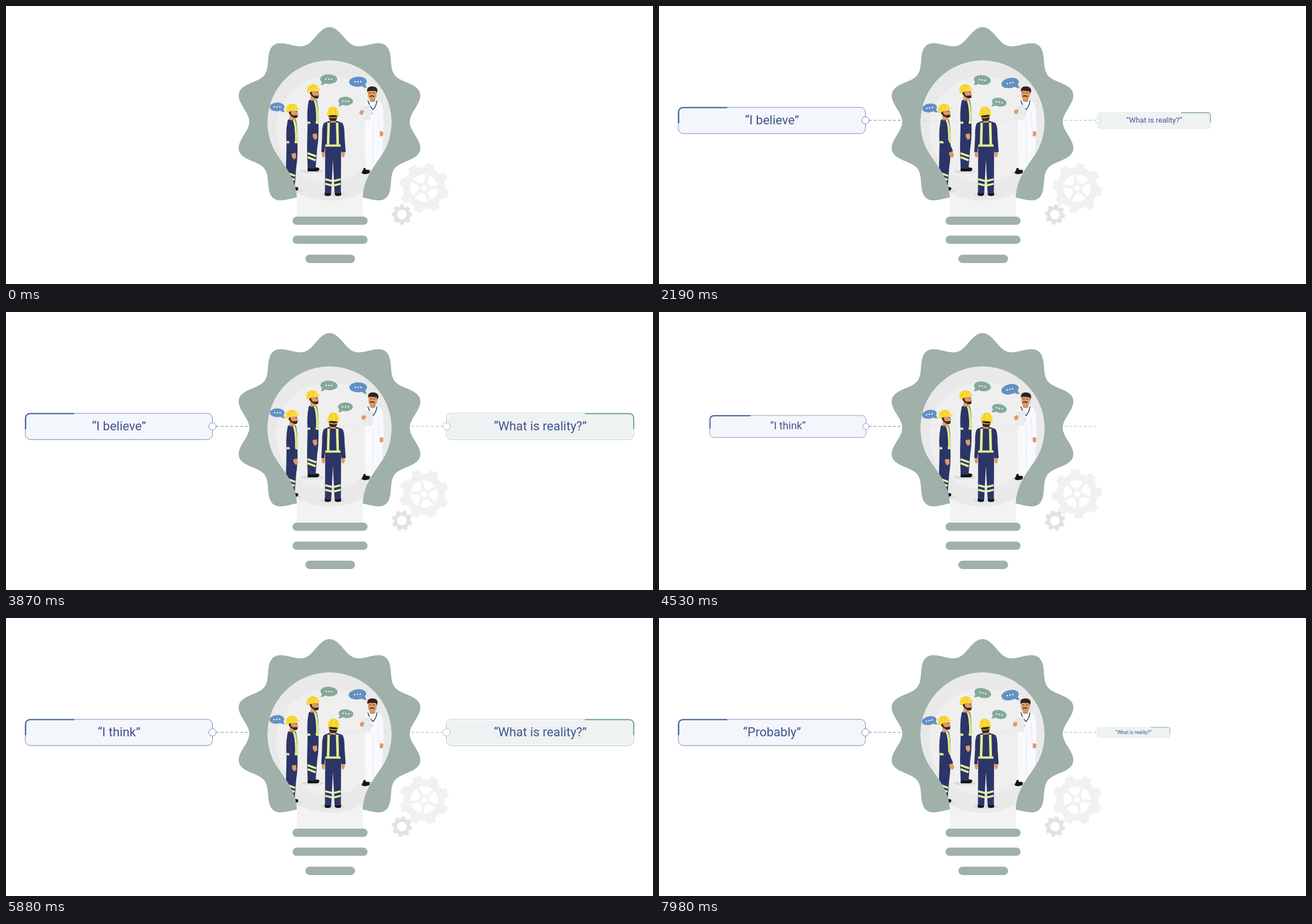
An HTML page for the animation above (8 s loop, 1139 by 491 pixels).

```html
<!DOCTYPE html>
<html lang="en">
<head>
<meta charset="utf-8">
<title>Conversation bulb</title>
<style>
  html, body { margin: 0; width: 100%; height: 100%; overflow: hidden; background: #fff; }
  svg { display: block; width: 100vw; height: 100vh; }
  text { font: 400 22px Roboto, Inter, sans-serif; fill: #42538f; text-anchor: middle; }
</style>
</head>
<body>
<svg id="stage" viewBox="0 0 1139 491"></svg>
<script>
const LOOP = 8000, CYCLE = 2940, TAU = Math.PI * 2;
const NAVY = '#2c3568', SAGE = '#9fb1a9', LIME = '#d5e860', PALE = '#eef0dc', SKIN = '#dd9a68', HAIR = '#35271f';
const stage = document.getElementById('stage');

const polar = (cx, cy, r, a) => `${(cx + r * Math.sin(a)).toFixed(2)},${(cy - r * Math.cos(a)).toFixed(2)}`;
const path = (d, fill, extra = '') => `<path d="${d}" fill="${fill}" ${extra}/>`;
const stroke = (d, color, width, extra = '') =>
  `<path d="${d}" fill="none" stroke="${color}" stroke-width="${width}" ${extra}/>`;
const circle = (x, y, r, fill, extra = '') => `<circle cx="${x}" cy="${y}" r="${r}" fill="${fill}" ${extra}/>`;
const ellipse = (x, y, rx, ry, fill) => `<ellipse cx="${x}" cy="${y}" rx="${rx}" ry="${ry}" fill="${fill}"/>`;
const part = (id, body) => `<g id="${id}">${body}</g>`;
const reflective = (d, width) => stroke(d, LIME, width) + stroke(d, PALE, width * .4);

function wavyWheel() {
  const points = [];
  for (let i = 0; i < 400; i++) {
    const a = i / 400 * TAU;
    points.push(polar(569.5, 204.5, 153.6 + 13 * Math.cos(10 * a) + 0.7 * Math.cos(20 * a), a));
  }
  return path(`M${points.join(' ')}Z`, SAGE);
}

function cog(id, cx, cy, teeth, outer, root, hole, color, extra = '') {
  const points = [], step = TAU / teeth;
  for (let i = 0; i < teeth; i++) {
    [[-.27, root], [-.18, outer], [.18, outer], [.27, root]]
      .forEach(([k, r]) => points.push(polar(cx, cy, r, (i + k) * step)));
  }
  const ring = `M${cx - hole},${cy}a${hole},${hole} 0 1 0 ${2 * hole},0a${hole},${hole} 0 1 0 ${-2 * hole},0Z`;
  return part(id, path(`M${points.join(' ')}Z${ring}`, color,
    `fill-rule="evenodd" stroke="${color}" stroke-width="2" stroke-linejoin="round"`) + extra);
}

function bigCog() {
  let hub = '';
  for (let i = 0; i < 5; i++) {
    const a = TAU * i / 5;
    hub += stroke(`M${polar(736, 321.5, 8, a)}L${polar(736, 321.5, 27, a)}`, '#f1f1f1', 5);
  }
  hub += circle(736, 321.5, 7.5, 'none', 'stroke="#f1f1f1" stroke-width="4.5"');
  return cog('bigCog', 736, 321.5, 8, 43, 36, 25, '#f1f1f1', hub);
}

function bubble(id, x, y, rx, ry, tail, color) {
  const [tx, ty] = tail, side = Math.sign(tx - x);
  return part(id, ellipse(x, y, rx, ry, color) +
    path(`M${x + side * rx * .8},${y + ry * .3}Q${tx - side * 2},${ty - 3} ${tx},${ty}Q${tx - side * 6},${ty} ${x + side * rx * .4},${y + ry * .8}Z`, color) +
    [-5, 0, 5].map(d => circle(x + d, y, 1.25, '#fff')).join(''));
}

function sideWorker(id) {
  return ellipse(538, 292, 20, 3.5, '#dedede') +
    path('M531,285H546L551,286Q553,290 548,292H531Z', '#141414') +
    path('M531,204H550Q551,232 548,250L545,287H531L530,250Z', NAVY) +
    path('M533,167Q540,161 547,166Q551,178 550,209H531Q529,186 533,167Z', NAVY) +
    stroke('M543,165Q549,176 548,205', LIME, 4) + stroke('M542.5,166Q547.5,178 546.5,205', PALE, 1.3) +
    reflective('M531,206H551', 4) +
    reflective('M531,260L546,265.5M531,267L545,272.5', 3.8) +
    part(id + 'Arm', path('M540,224H547L548,232Q546,237 543,236L540,231Z', SKIN) +
      path('M533,194L543,192L548,225L540,226Z', NAVY)) +
    path('M533,169Q541,165 543,175L544,200Q538,206 533,200Z', NAVY) +
    stroke('M542,172L543,196', '#242b57', .7) +
    part(id + 'Head', path('M537,150H549.5L551.5,157L549.5,163H545V167H536Z', SKIN) +
      path('M535,150H538.5V155Q541,160 545,158.5L550.5,158.5L550,162Q547,165 543,162.5Q538,160 535,155Z', HAIR) +
      path('M546.5,152L550,151.5V152.6H546.5Z', HAIR) +
      path('M530,153Q528,139 540,138Q549,138 551,146L554,148Q553,150 547,149Q538,150 533,154Z', '#fbda35') +
      stroke('M535,149Q536,141 541,139M541,147Q545,142 542,139', '#e4bb20', .9));
}

function backWorker() {
  const legBands = 'M562,306L574,309M562,314L574,317M589,306L577,309M589,314L577,317';
  return ellipse(575, 333, 22, 3.5, '#dcdcdc') +
    path('M561,329H572V334Q566,337 561,334ZM579,329H590V334Q585,337 579,334Z', '#141414') +
    path('M556,256H562L561,266Q558,270 556,264ZM590,256H597L596,265Q593,270 591,265Z', SKIN) +
    path('M562,240H590L589.5,331H578.5L575.5,272L572.5,331H561.5Z', NAVY) +
    path('M569,203H582L592,206.5Q596,211 596,230L598,258H590.5L589,248H562L560.5,258H555L556.5,230Q556,211 560,206.5Z', NAVY) +
    stroke('M562,215V248M590,215V248', '#232b58', .8) +
    stroke('M568,206L567,245M583,206L584,245', LIME, 4.6) +
    stroke('M568,206L567,245M583,206L584,245', PALE, 1.7) +
    reflective('M562,246.5H589', 4) +
    reflective(legBands, 3.8) +
    part('backHead', path('M570.5,198H580.5V206H570.5Z', SKIN) +
      path('M567.5,192H583.5Q583,200 580,203H571Q568,200 567.5,192Z', HAIR) +
      path('M565,194Q565,178 575.5,177.5Q586,178 586,194Q576,191 565,194Z', '#fbda35') +
      stroke('M571,192Q570,183 573,179M580,192Q581,183 578,179', '#e4bb20', .9) +
      stroke('M568,196Q576,199 583,196', '#fbda35', 1.2));
}

function doctor() {
  return ellipse(638, 294, 17, 3, '#dedede') +
    path('M630,286H641L640,295Q630,299 626,295Z', '#141414') +
    path('M636,167Q645,163 655,167Q664,170 664,190L663,250L662,292L633,289Q630,235 632,202L630,176Z', '#f8f9fd') +
    stroke('M657,184L659,218M647,204L646,282', '#e2e4ee', .8) +
    path('M658,220L664,222L664,228Q660,233 658,229Z', SKIN) +
    path('M656,171Q664,172 664,192L665,222L657,221L655,185Z', '#f8f9fd') +
    stroke('M655,186L657,221', '#e0e3ed', .8) +
    stroke('M637,167Q640,177 646,183Q652,177 653,167', '#345277', 1.7) +
    circle(644, 190, 2.4, '#d8dadd') +
    part('clip', path('M625,176L641,174L642,201L626,202Z', '#e9ebec') +
      path('M622,187Q625,182 630,185L629,190Q626,194 623,191Z', SKIN) +
      stroke('M629,180H638', '#d5d8da', 1)) +
    part('docHead', path('M640.5,162H650V168Q645,171 640.5,168Z', '#cd8b5b') +
      path('M637,148Q645,143 653,148L652,160Q649,166.5 644,166.5Q639,166 637,158Z', SKIN) +
      path('M636,152Q634,143 643,142Q653,141 654,149L652.5,154L651,150H639Z', '#30241f') +
      stroke('M640,160Q644,157.5 648,160', '#30241f', 1.6) +
      stroke('M639.5,153.5H642.5M645.5,153.5H648.5', '#30241f', .9));
}

function label(id, right) {
  const edge = right ? '#a2c3b6' : '#7589b6', dark = right ? '#75a68f' : '#43609e';
  const x = right ? 775.5 : 34, knob = right ? 775.5 : 363.5;
  const accent = right ? 'M1019,179.5H1096Q1105,179.5 1105,188V207' : 'M34.5,207V188Q34.5,179.5 43,179.5H120';
  return `<g id="${id}">
    <rect x="${x}" y="179" width="329.5" height="46.3" rx="9" fill="${right ? '#eef2f2' : '#f3f6fb'}" stroke="${edge}"/>
    ${right ? '<rect x="776.7" y="180.2" width="327" height="43.9" rx="8" fill="none" stroke="#fff" stroke-width="1.2"/>' : ''}
    ${stroke(accent, dark, 2.2)}
    ${circle(knob, 202, 6.5, '#fff', `stroke="${edge}"`)}
    <text x="${x + 165}" y="208.5">“What is reality?”</text></g>`;
}

const bar = (x, y, w) => `<rect x="${x}" y="${y}" width="${w}" height="14.6" rx="7.3" fill="${SAGE}"/>`;
const glass = 'M471,252A109,109 0 1 1 668,252C655,276 629,300 628,338V372H512V338C510,300 484,276 471,252Z';

stage.innerHTML = `
  <defs><clipPath id="glass"><path d="${glass}"/></clipPath></defs>
  ${bigCog()}
  ${cog('smallCog', 697, 368.3, 8, 17, 13.5, 9.5, '#e2e2e2')}
  ${stroke('', '#6d84b2', 1.2, 'id="leftLine" stroke-dasharray="5 3.5"')}
  ${stroke('', '#9dbcb2', 1.2, 'id="rightLine" stroke-dasharray="5 3.5"')}
  ${wavyWheel()}
  <g clip-path="url(#glass)">
    <rect x="450" y="90" width="240" height="285" fill="#f3f3f3"/>
    ${circle(569.5, 220, 124, '#e9e9e9')}
    ${circle(569.5, 218, 94, '#efefef')}
    ${stroke('', '#7f9a94', 1, 'id="innerLine" stroke-dasharray="4 3" opacity=".2"')}
    ${sideWorker('top')}
    <g transform="translate(-37 34.5)">${sideWorker('left')}</g>
    ${doctor()}
    ${backWorker()}
  </g>
  ${bubble('talkTop', 568, 129, 15, 8.5, [554, 139.5], '#86a998')}
  ${bubble('talkDoc', 620, 133, 15.5, 9, [635, 144.5], '#6391c4')}
  ${bubble('talkLeft', 477.5, 178, 13, 7.7, [491, 187.5], '#6391c4')}
  ${bubble('talkBack', 597.5, 167.5, 13, 7.7, [585, 177], '#86a998')}
  ${bar(504.5, 372, 132)}${bar(504.5, 405.5, 132)}${bar(527, 439.3, 87.5)}
  ${label('leftBox', false)}
  ${label('rightBox', true)}`;

const el = Object.fromEntries([...stage.querySelectorAll('[id]')].map(n => [n.id, n]));
const leftText = el.leftBox.querySelector('text');
const phrases = ['“I believe”', '“I think”', '“Probably”'];

const clamp = v => Math.min(1, Math.max(0, v));
const grow = (t, start) => 1 - (1 - clamp((t - start) / 800)) ** 3;
const pulse = (t, period, peak, power = 1) => ((1 + Math.cos(TAU * (t / period - peak))) / 2) ** power;
const turn = (node, angle, x, y) => node.setAttribute('transform', `rotate(${angle.toFixed(3)} ${x} ${y})`);

function pop(node, x, scale, opacity) {
  node.setAttribute('transform', `translate(${x} 202) scale(${Math.max(scale, .0001)}) translate(${-x} -202)`);
  node.setAttribute('opacity', opacity);
  node.style.display = scale > 0 && opacity > 0 ? '' : 'none';
}

function draw(t) {
  turn(el.bigCog, 15 - .044 * t, 736, 321.5);
  turn(el.smallCog, .086 * t, 697, 368.3);

  const reach = 200 * grow(t, 508);
  el.leftLine.setAttribute('d', `M${569.5 - reach},202H569.5`);
  el.rightLine.setAttribute('d', `M569.5,202H${569.5 + reach}`);
  el.innerLine.setAttribute('d', `M${569.5 - reach},202H${569.5 + reach}`);
  for (const id of ['leftLine', 'rightLine', 'innerLine']) el[id].style.display = reach ? '' : 'none';

  // Each phrase replaces the last one once it has faded.
  const turnNo = Math.min(2, Math.max(0, Math.floor((t - 1230) / CYCLE)));
  const local = t - turnNo * CYCLE;
  const opacity = 1 - clamp((local - 3870) / 300);
  leftText.textContent = phrases[turnNo];
  pop(el.leftBox, 369, grow(local, 1230), opacity);
  pop(el.rightBox, 768.7, grow(local, 1980), opacity);

  turn(el.talkTop, 14 * pulse(t, 1200, .57), 554, 139.5);
  turn(el.talkDoc, -13 * pulse(t, 1200, .73, 2), 635, 144.5);
  turn(el.talkLeft, -13 * pulse(t, 1200, .67, 1.8), 491, 187.5);
  turn(el.talkBack, 13 * pulse(t, 1200, .71, 1.8), 585, 177);

  const nod = pulse(t, 7000, .48), reachOut = pulse(t, 5400, .47, 1.5);
  turn(el.docHead, 6 * nod, 645, 167);
  turn(el.clip, 8 * nod, 640, 215);
  turn(el.topHead, -5 * nod, 541, 165);
  turn(el.leftHead, -7 * reachOut, 541, 165);
  turn(el.leftArm, -15 * reachOut, 538, 197);
  turn(el.backHead, -6 * Math.sin(TAU * t / 6800), 575.5, 204);
}

const begin = performance.now();
function tick() {
  draw((performance.now() - begin) % LOOP);
  requestAnimationFrame(tick);
}
tick();
</script>
</body>
</html>
```
